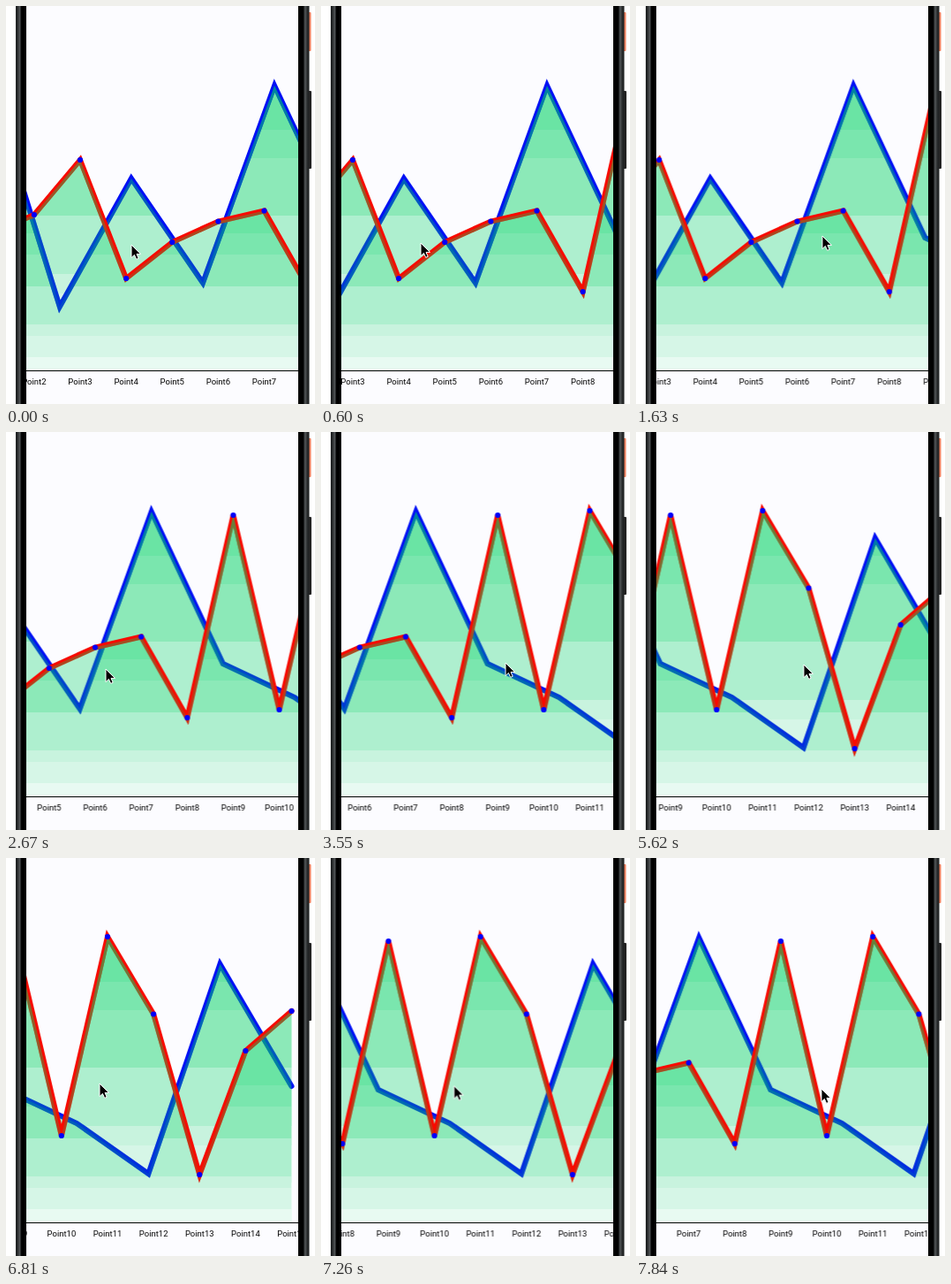
Animation of 350x450 px, one loop 7990 ms. Source, as an HTML page:

```html
<!DOCTYPE html>
<html lang="en">
<head>
<meta charset="utf-8">
<title>Scrolling area chart</title>
<style>
  html, body { margin: 0; width: 100%; height: 100%; overflow: hidden; background: #fff; }
  svg { display: block; width: 350px; height: 450px; }
  text { font: 9.5px Roboto, "Open Sans", sans-serif; text-anchor: middle; fill: #000; }
  .line { fill: none; stroke-width: 6; stroke-linejoin: miter; stroke-miterlimit: 4; stroke-linecap: round; }
  .tint { stroke: url(#tint); }
  .blue { stroke: #0010f5; }
  .red { stroke: #f80a00; }
  #chart, #cursor { animation: scroll 7990ms -5ms infinite; }
  #cursor { animation-name: point; }

  /* 54 equal ticks per loop; each segment advances once per tick */
  @keyframes scroll {
    0%      { transform: translateX(-72.4px);  animation-timing-function: steps(2); }
    3.704%  { transform: translateX(-101px);   animation-timing-function: steps(3); }
    9.259%  { transform: translateX(-130.2px); animation-timing-function: steps(6); }
    20.37%  { transform: translateX(-130.2px); animation-timing-function: steps(7); }
    33.333% { transform: translateX(-211.8px); animation-timing-function: steps(2); }
    37.037% { transform: translateX(-244px);   animation-timing-function: steps(3); }
    42.593% { transform: translateX(-268px);   animation-timing-function: steps(1); }
    44.444% { transform: translateX(-269px);   animation-timing-function: steps(6); }
    55.556% { transform: translateX(-349.8px); animation-timing-function: steps(2); }
    59.259% { transform: translateX(-384px);   animation-timing-function: steps(3); }
    64.815% { transform: translateX(-408px);   animation-timing-function: steps(2); }
    68.519% { transform: translateX(-410px);   animation-timing-function: steps(1); }
    70.37%  { transform: translateX(-430px);   animation-timing-function: steps(4); }
    77.778% { transform: translateX(-458.5px); animation-timing-function: steps(4); }
    85.185% { transform: translateX(-458.5px); animation-timing-function: steps(7); }
    98.148%, 100% { transform: translateX(-305.2px); }
  }
  @keyframes point {
    0%      { transform: translate(142px, 270px); animation-timing-function: steps(2); }
    3.704%  { transform: translate(113px, 268px); animation-timing-function: steps(5); }
    12.963% { transform: translate(113px, 268px); animation-timing-function: steps(4); }
    20.37%  { transform: translate(211px, 260px); animation-timing-function: steps(7); }
    33.333% { transform: translate(113px, 268px); animation-timing-function: steps(2); }
    37.037% { transform: translate(113px, 268px); animation-timing-function: steps(4); }
    44.444% { transform: translate(209px, 261px); animation-timing-function: steps(6); }
    55.556% { transform: translate(113px, 267px); animation-timing-function: steps(3); }
    61.111% { transform: translate(113px, 267px); animation-timing-function: steps(4); }
    68.519% { transform: translate(211px, 262px); animation-timing-function: steps(1); }
    70.37%  { transform: translate(190px, 263px); animation-timing-function: steps(4); }
    77.778% { transform: translate(116px, 258px); animation-timing-function: steps(4); }
    85.185% { transform: translate(106px, 255px); animation-timing-function: steps(7); }
    98.148%, 100% { transform: translate(210px, 261px); }
  }
</style>
</head>
<body>
<svg viewBox="0 0 350 450">
  <defs>
    <linearGradient id="bezel">
      <stop offset="0" stop-color="#1c1e1f"/>
      <stop offset=".2" stop-color="#2a2d2e"/>
      <stop offset=".36" stop-color="#54585a"/>
      <stop offset=".5" stop-color="#1a1c1d"/>
      <stop offset=".55" stop-color="#000"/>
    </linearGradient>
    <linearGradient id="tint" gradientUnits="userSpaceOnUse" x1="0" y1="80" x2="0" y2="412">
      <stop offset="0" stop-color="#00d264" stop-opacity=".626"/>
      <stop offset="1" stop-color="#00d264" stop-opacity=".03"/>
    </linearGradient>
    <linearGradient id="single" gradientUnits="userSpaceOnUse" x1="0" y1="0" x2="0" y2="412"/>
    <linearGradient id="double" gradientUnits="userSpaceOnUse" x1="0" y1="0" x2="0" y2="412"/>
    <path id="blueLine"/>
    <path id="redLine"/>
    <path id="blueArea"/>
    <path id="redArea"/>
    <clipPath id="inBlue"><use href="#blueArea"/></clipPath>
    <clipPath id="inRed"><use href="#redArea"/></clipPath>
    <clipPath id="screen"><rect x="23" width="308" height="450"/></clipPath>
  </defs>

  <rect x="342" y="7" width="3.5" height="44" rx="1" fill="#f0805f"/>
  <rect x="342" y="96" width="4" height="88" rx="1" fill="#242424"/>
  <rect x="11" width="12" height="450" fill="url(#bezel)"/>
  <rect x="331" width="12.5" height="450" fill="url(#bezel)" transform="translate(674.5) scale(-1 1)"/>
  <rect x="23" width="308" height="450" fill="#fcfcff"/>

  <g clip-path="url(#screen)">
    <g id="chart">
      <use href="#blueArea" fill="url(#single)"/>
      <use href="#redArea" fill="url(#single)"/>
      <use href="#blueArea" fill="url(#double)" clip-path="url(#inRed)"/>
      <use href="#blueLine" class="line blue"/>
      <g clip-path="url(#inBlue)"><use href="#blueLine" class="line tint"/></g>
      <g clip-path="url(#inRed)"><use href="#blueLine" class="line tint"/></g>
      <use href="#redLine" class="line red"/>
      <g clip-path="url(#inRed)"><use href="#redLine" class="line tint"/></g>
      <g id="marks"></g>
    </g>
  </g>
  <rect x="23" y="412" width="308" height="1" fill="#000"/>
  <path id="cursor" d="M0 0V14.6L3.4 11.4L5.7 16.4L8.2 15.3L6 10.4H10.6Z" fill="#000" stroke="#fff" stroke-width="1"/>
</svg>

<script>
  const GAP = 52.13, BASE = 412, LAST = 15;
  const redY = [258, 236, 174, 308, 267, 243.5, 231.5, 323, 94, 314, 89, 176.5, 358, 218, 173];
  const blueY = [80, 340, 195, 313, 90, 262, 300, 357, 120, 258];
  const get = id => document.getElementById(id);

  // Spread the values evenly between the first and last label
  const spread = ys => ys.map((y, i) => [GAP * (1 + i * (LAST - 1) / (ys.length - 1)), y]);

  function drawSeries(name, pts) {
    const line = "M" + pts.map(([x, y]) => x.toFixed(2) + " " + y).join("L");
    get(name + "Line").setAttribute("d", line);
    get(name + "Area").setAttribute("d", `${line}V${BASE}H${pts[0][0]}Z`);
  }

  function add(parent, tag, attrs, text = "") {
    const el = document.createElementNS("http://www.w3.org/2000/svg", tag);
    for (const key in attrs) el.setAttribute(key, attrs[key]);
    el.textContent = text;
    parent.append(el);
  }

  const shades = ["#6ae4a4", "#7ae6ae", "#8ce9b8", "#aeefcf", "#c8f3de", "#d6f6e7", "#e8faf2"];

  // Flat colour bands, each ending at the given height
  function addBands(id, ends) {
    let top = 0;
    ends.forEach((end, i) => {
      for (const y of [top, end]) add(get(id), "stop", { offset: y / BASE, "stop-color": shades[i] });
      top = end;
    });
  }

  const red = spread(redY);
  drawSeries("red", red);
  drawSeries("blue", spread(blueY));
  addBands("single", [140, 172, 237, 303, 325, 367, BASE]);
  addBands("double", [257, 281, 317, 360, 373, 397, BASE]);
  red.forEach(([x, y], i) => {
    add(get("marks"), "circle", { cx: x, cy: y, r: 3.1, fill: "#0000fa" });
    add(get("marks"), "text", { x, y: 427.7 }, "Point" + (i + 1));
  });
</script>
</body>
</html>
```
